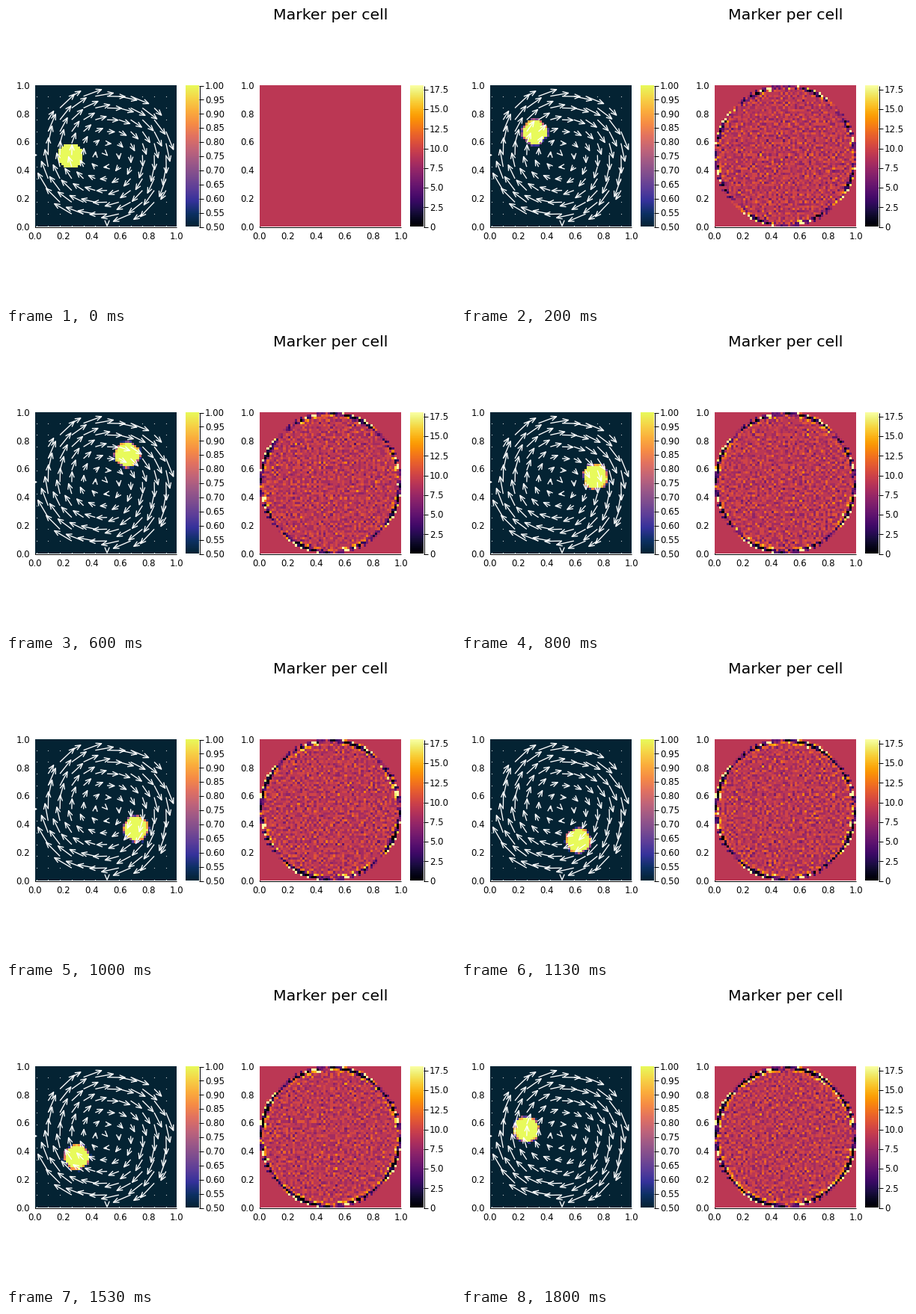
Write a matplotlib script that moves like this. It is 600 by 400 pixels and loops after 1.87 s.

```python
import numpy as np
import matplotlib.pyplot as plt
from matplotlib.animation import FuncAnimation
from matplotlib.collections import LineCollection
from matplotlib.colors import LinearSegmentedColormap

N = 60                      # cells per side
SIDE, TOP, BOTTOM = 189, 106.5, 295.5
PX = SIDE / N
LEFT_A, LEFT_B = 39, 339
STEPS, SUB = 28, 6
TURN = np.radians(14.13)    # rotation per step
LAST = 0.35                 # the closing step is shorter
C = N / 2
R = 0.485 * N

rng = np.random.default_rng(4)
thermal = LinearSegmentedColormap.from_list("thermal", [
    "#042333", "#0d3064", "#35329b", "#5d3e99", "#7e4d8f", "#9e5987",
    "#c16479", "#e17161", "#f68b45", "#fbad3c", "#f6d346", "#e8fa5b"])


def rotation(x, y):
    """Clockwise solid-body rotation, at rest outside the circle."""
    inside = np.hypot(x - C, y - C) < R
    return (y - C) * inside, (C - x) * inside


# velocities on cell faces
face, mid = np.arange(N + 1.0), np.arange(N) + 0.5
U = rotation(*np.meshgrid(face, mid, indexing="ij"))[0]
V = rotation(*np.meshgrid(mid, face, indexing="ij"))[1]


def bilinear(f, x, y):
    i = np.clip(x.astype(int), 0, f.shape[0] - 2)
    j = np.clip(y.astype(int), 0, f.shape[1] - 2)
    a, b = np.clip(x - i, 0, 1), np.clip(y - j, 0, 1)
    return ((1 - a) * ((1 - b) * f[i, j] + b * f[i, j + 1])
            + a * ((1 - b) * f[i + 1, j] + b * f[i + 1, j + 1]))


def velocity(x, y):
    return bilinear(U, x, y - 0.5), bilinear(V, x - 0.5, y)


def advect(x, y, dt):
    u, v = velocity(x, y)
    u, v = velocity(x + u * dt / 2, y + v * dt / 2)
    top = N - 1e-6
    return np.clip(x + u * dt, 0, top), np.clip(y + v * dt, 0, top)


def to_grid(x, y, phase):
    cell = y.astype(int) * N + x.astype(int)
    count = np.bincount(cell, minlength=N * N)
    total = np.bincount(cell, phase, minlength=N * N)
    mean = np.where(count > 0, total / np.maximum(count, 1), 0.5)
    return mean.reshape(N, N), count.reshape(N, N)


def simulate():
    # nine jittered markers per cell
    sub = np.arange(3 * N)
    x, y = (g.ravel() for g in np.meshgrid(sub, sub))
    x = (x + rng.random(x.size)) / 3
    y = (y + rng.random(y.size)) / 3
    far = np.hypot(np.floor(x) + 0.5 - N / 4, np.floor(y) + 0.5 - C)
    phase = np.where(far < 0.09 * N, 1.0, 0.5)
    states = [to_grid(x, y, phase)]
    for k in range(1, STEPS):
        dt = TURN * (LAST if k == STEPS - 1 else 1) / SUB
        for _ in range(SUB):
            x, y = advect(x, y, dt)
        states.append(to_grid(x, y, phase))
    return states


states = simulate()

fig = plt.figure(figsize=(6, 4), dpi=100, facecolor="white")
ax = fig.add_axes([0, 0, 1, 1])
ax.axis("off")


def label(x, y, s, ha, px=11.8):
    ax.text(x, y, s, ha=ha, va="baseline", fontsize=px * 0.72,
            family="DejaVu Sans", color="black")


def line(xs, ys, z=3):
    ax.plot(xs, ys, color="black", lw=0.72, zorder=z, solid_capstyle="butt")


def image(data, left, width, cmap, lo, hi):
    return ax.imshow(data, extent=(left, left + width, BOTTOM, TOP),
                     origin="lower", aspect="auto", cmap=cmap, vmin=lo,
                     vmax=hi, interpolation="nearest", zorder=2)


def panel(left, data, cmap, lo, hi, ticks, fmt):
    line([left, left, left + SIDE], [TOP, BOTTOM, BOTTOM], 1)
    for t in np.linspace(0, 1, 6):
        label(left + t * SIDE, 311.8, f"{t:.1f}", "center")
        label(left - 7, BOTTOM - t * SIDE + 4.3, f"{t:.1f}", "right")
    bar = left + 201
    image(np.linspace(lo, hi, 256)[:, None], bar, 18, cmap, lo, hi)
    line([bar + 18.5] * 2, [TOP, BOTTOM])
    for t in ticks:
        y = BOTTOM - (t - lo) / (hi - lo) * SIDE
        line([bar + 18, bar + 24], [y, y])
        label(bar + 26, y + 4.3, fmt(t), "left")
    return image(data, left, SIDE, cmap, lo, hi)


def arrows():
    gx, gy = (g.ravel() for g in np.meshgrid(mid[::5], mid[::5]))
    u, v = velocity(gx, gy)
    base = np.column_stack([LEFT_A + gx * PX, BOTTOM - gy * PX])
    vec = np.column_stack([u, -v]) * PX * 0.3
    size = np.hypot(*vec.T)
    still = size < 1e-9
    ax.plot(*base[still].T, "o", ms=0.9, mew=0, color="white",
            alpha=0.8, zorder=4)
    segs = []
    for p, d, s in zip(base[~still], vec[~still], size[~still]):
        tip = p + d
        back = -d / s * 7.5
        side = np.array([-back[1], back[0]]) * 0.42
        segs += [[p, tip], [tip + back + side, tip, tip + back - side]]
    ax.add_collection(LineCollection(segs, colors="white",
                                     linewidths=0.95, zorder=4))


phase_im = panel(LEFT_A, states[0][0], thermal, 0.5, 1.0,
                 np.linspace(0.5, 1, 11), "{:.2f}".format)
count_im = panel(LEFT_B, states[0][1], "inferno", 0, 18,
                 np.arange(0, 18, 2.5), lambda t: f"{t:.1f}" if t else "0")
arrows()
label(433.5, 18, "Marker per cell", "center", 20.5)
ax.set_xlim(0, 600)
ax.set_ylim(400, 0)


def update(tick):
    k = min(int((tick * 10 + 5) * 3 / 200), STEPS - 1)
    phase, count = states[k]
    phase_im.set_data(phase)
    count_im.set_data(count)
    return phase_im, count_im


anim = FuncAnimation(fig, update, frames=187, interval=10, repeat=True,
                     repeat_delay=0, blit=False)
plt.show()
```
